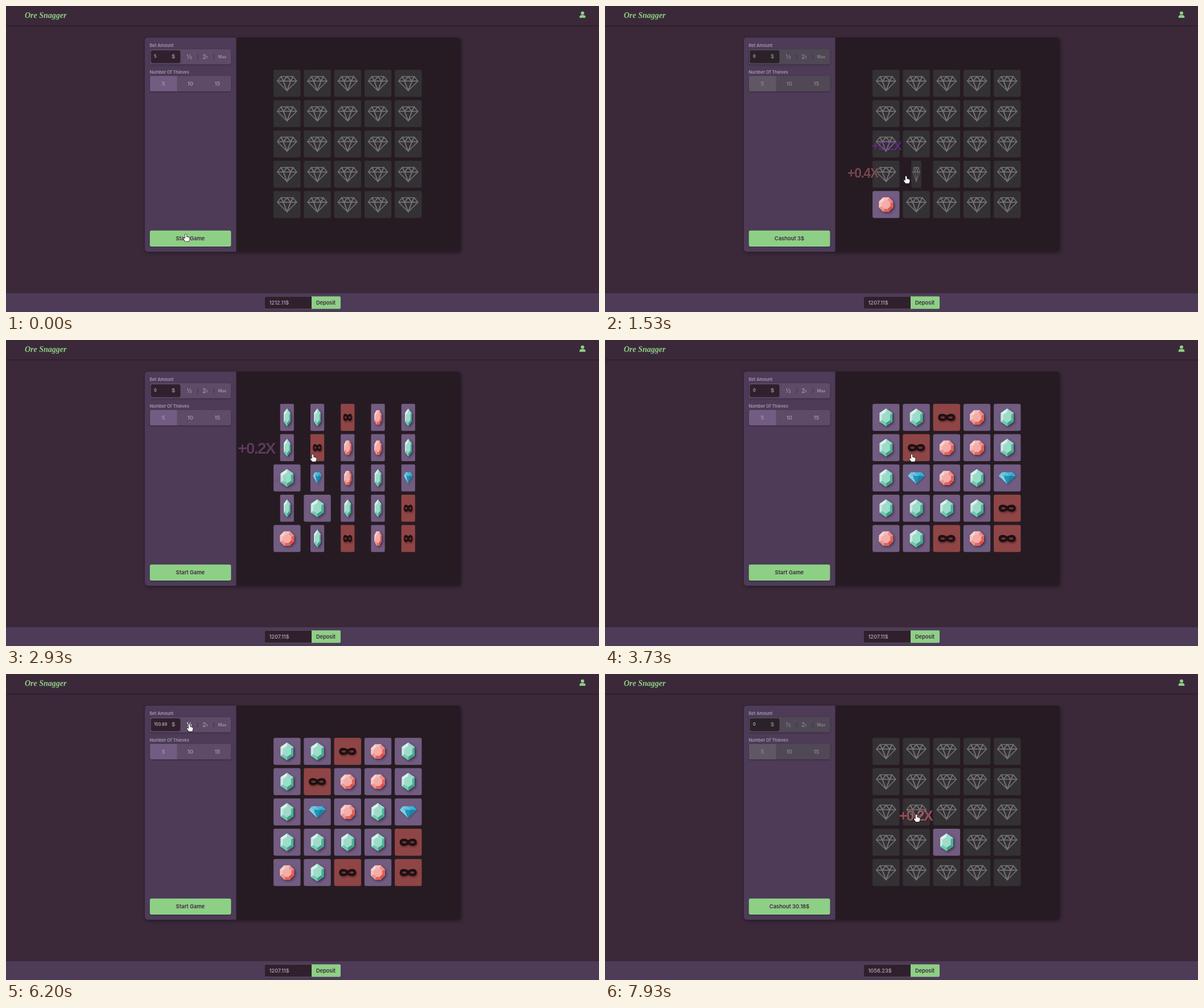
These frames come from a looping animation (1042x538 px, 8 s). An HTML page with a canvas:

```html
<!DOCTYPE html>
<html lang="en">
<head>
<meta charset="utf-8">
<title>Ore Snagger</title>
<style>
  html, body { margin: 0; width: 100%; height: 100%; overflow: hidden; background: #3b293a; }
  canvas { display: block; width: 1042px; height: 538px; }
</style>
</head>
<body>
<canvas id="stage" width="1042" height="538"></canvas>
<script>
const ctx = document.getElementById('stage').getContext('2d');
const LOOP = 8000, FLIP = 600, POPUP = 1600, GLIDE = 400;
const TILE = 47.4, PITCH = 53.25, GRID_X = 470.1, GRID_Y = 112.3;
const BOARD = 'GGTRG' + 'GTRRG' + 'GBRGB' + 'GGGGT' + 'RGTRT';
const PAGE = '#3b293a', PANEL = '#4d3b58', GREEN = '#8ecf86';

const DEPOSITED = 1212.11;
const MAX_CLICK = 5130, HALF_CLICKS = [5470, 5700, 5900];
const GAMES = [
  { start: 400, reveal: 2696, stake: 5, picks: [
    { tile: 20, time: 900, bonus: 0.4, x: 453, y: 302, size: 23, color: '#935a5f' },
    { tile: 16, time: 1389, bonus: 0.2, x: 495, y: 254, size: 22, color: '#9632d6' },
    { tile: 10, time: 2096, bonus: 0.2, x: 440, y: 200, size: 28, color: '#86548a' }] },
  { start: 6730, reveal: Infinity, stake: 150.88, picks: [
    { tile: 17, time: 7270, bonus: 0.2, x: 546, y: 258, size: 25, color: '#c0626a' }] }
];
// Arrival time and place of the pointer tip
const STOPS = [[0, 316, 401], [880, 500, 345], [1380, 529, 299], [2050, 507, 239], [2640, 539, 201],
  [4250, 280, 220], [4550, 333, 111], [4800, 383, 92], [5400, 322, 88], [6650, 334, 400],
  [7240, 597, 300], [7870, 547, 247]];

const clamp = v => Math.max(0, Math.min(1, v));
const within = (t, a, b) => t >= a && t < b;
const pulse = (t, from, to) => clamp(Math.min(t - from, to - t) / 100);
const sum = values => values.reduce((a, b) => a + b, 0);

// The standard CSS "ease" curve
function ease(x) {
  let lo = 0, hi = 1, s;
  for (let i = 0; i < 20; i++) {
    s = (lo + hi) / 2;
    if (0.75 * s * (1 - s) + s ** 3 < x) lo = s; else hi = s;
  }
  return 0.3 * (1 - s) ** 2 * s + 3 * (1 - s) * s * s + s ** 3;
}

function stateAt(t) {
  const started = GAMES.filter(g => g.start <= t);
  const game = started.at(-1);
  const playing = Boolean(game) && t < game.reveal;
  const picks = game ? game.picks.filter(p => p.time <= t) : [];
  const balance = DEPOSITED - sum(started.map(g => g.stake));
  let bet = game ? 0 : GAMES[0].stake;
  if (within(t, MAX_CLICK, GAMES[1].start)) {
    const halvings = HALF_CLICKS.filter(c => c <= t).length;
    bet = Math.floor(balance * 100 / 2 ** halvings) / 100;
  }
  const win = playing ? game.stake * sum(picks.map(p => p.bonus)) : 0;
  return { game, playing, balance, bet, action: playing ? `Cashout ${+win.toFixed(2)}$` : 'Start Game' };
}

function box(x, y, w, h, radius, color) {
  ctx.fillStyle = color;
  ctx.beginPath();
  ctx.roundRect(x, y, w, h, radius);
  ctx.fill();
}

function withShadow(dx, dy, blur, alpha, draw) {
  ctx.save();
  ctx.shadowColor = `rgba(0,0,0,${alpha})`;
  ctx.shadowOffsetX = dx;
  ctx.shadowOffsetY = dy;
  ctx.shadowBlur = blur;
  draw();
  ctx.restore();
}

function text(str, x, y, size, color, align = 'left') {
  ctx.font = `600 ${size}px Inter, sans-serif`;
  ctx.fillStyle = color;
  ctx.textAlign = align;
  ctx.fillText(str, x, y);
}

function trace(points) {
  ctx.beginPath();
  points.forEach(p => ctx.lineTo(...p));
  ctx.closePath();
}

function poly(points, color) {
  trace(points);
  ctx.fillStyle = color;
  ctx.fill();
}

// Regular stone with a flat table; facets are lit from the upper left
function cutStone(sides, turn, rx, ry, shrink, hue, sat, light, contrast) {
  const ring = k => Array.from({ length: sides }, (_, i) => {
    const a = turn + i * 2 * Math.PI / sides;
    return [k * rx * Math.cos(a), k * ry * Math.sin(a)];
  });
  const outer = ring(1), inner = ring(shrink);
  const table = `hsl(${hue} ${sat}% ${light + 7}%)`;
  withShadow(2, 2, 4, 0.5, () => poly(outer, table));
  outer.forEach((p, i) => {
    const j = (i + 1) % sides;
    const facing = Math.cos(turn + (i + 0.5) * 2 * Math.PI / sides + 2.4);
    poly([p, outer[j], inner[j], inner[i]], `hsl(${hue} ${sat}% ${light + contrast * facing}%)`);
  });
  poly(inner, table);
}

// Triangles of a side-view diamond: a strip along the crown, then a fan to the tip
function brilliant(halfWidth, top, girdle, tip) {
  const at = (k, y) => [k * halfWidth, y];
  const g = [-1, -0.38, 0.38, 1].map(k => at(k, girdle));
  const c = [-0.62, 0, 0.62].map(k => at(k, top));
  const strip = [g[0], c[0], g[1], c[1], g[2], c[2], g[3]];
  const crown = strip.slice(2).map((_, i) => strip.slice(i, i + 3));
  const fan = g.slice(1).map((p, i) => [g[i], p, [0, tip]]);
  return [...crown, ...fan];
}

function mask() {
  ctx.fillStyle = '#1e0f13';
  ctx.beginPath();
  ctx.moveTo(0, -3.5);
  for (const s of [1, -1]) {
    ctx.bezierCurveTo(6 * s, -8 * s, 15 * s, -7 * s, 15 * s, 0);
    ctx.bezierCurveTo(15 * s, 7 * s, 6 * s, 8 * s, 0, 3.5 * s);
  }
  for (const x of [-7, 7]) {
    ctx.moveTo(x + 4, 0);
    ctx.ellipse(x, 0, 4, 1.9, 0, 0, 7);
  }
  ctx.fill('evenodd');
}

const faces = {
  G: () => cutStone(6, -Math.PI / 2, 13, 15.5, 0.62, 164, 45, 67, 25),
  R: () => cutStone(8, Math.PI / 8, 13.4, 13.4, 0.6, 3, 75, 74, 16),
  B: () => withShadow(1, 1, 3, 0.3, () =>
    brilliant(15, -10, -3.5, 11).forEach((tri, i) => poly(tri, `hsl(194 72% ${i % 5 ? 72 - 5 * i : 70}%)`))),
  T: () => withShadow(1, 2, 3, 0.4, mask)
};

function hiddenFace() {
  ctx.strokeStyle = '#737073';
  ctx.lineWidth = 1.7;
  ctx.lineJoin = 'round';
  for (const triangle of brilliant(17, -12, -4, 13)) {
    trace(triangle);
    ctx.stroke();
  }
}

function drawTile(i, t, game) {
  const pick = game?.picks.find(p => p.tile === i);
  const start = pick ? pick.time : game ? game.reveal : Infinity;
  const turn = ease(clamp((t - start) / FLIP));
  const open = turn > 0.5, kind = BOARD[i];
  ctx.save();
  ctx.translate(GRID_X + (i % 5) * PITCH + TILE / 2, GRID_Y + Math.floor(i / 5) * PITCH + TILE / 2);
  ctx.scale(Math.max(0.01, Math.abs(Math.cos(turn * Math.PI))), 1);
  box(-TILE / 2, -TILE / 2, TILE, TILE, 3, !open ? '#333133' : kind === 'T' ? '#8f4545' : '#725c81');
  if (open) faces[kind](); else hiddenFace();
  ctx.restore();
}

function drawPopup({ time, bonus, x, y, size, color }, t) {
  const age = t - time, rise = POPUP / 5;
  if (!within(age, 0, POPUP)) return;
  ctx.save();
  ctx.globalAlpha = Math.min(age / rise, (POPUP - age) / (POPUP - rise));
  ctx.font = `700 ${size}px "Liberation Sans", sans-serif`;
  ctx.letterSpacing = '-0.06em';
  ctx.textAlign = 'center';
  ctx.fillStyle = color;
  withShadow(1, 1, 1, 0.5, () => ctx.fillText(`+${bonus}X`, x, y));
  ctx.restore();
}

function drawHeaderAndFooter({ balance }) {
  ctx.fillStyle = PAGE;
  ctx.fillRect(0, 0, 1042, 538);
  withShadow(0, 1, 3, 0.4, () => box(-5, -5, 1052, 39, 0, PAGE));
  box(0, 505, 1042, 33, 0, PANEL);

  ctx.font = 'italic 700 14px "Liberation Serif", serif';
  ctx.textAlign = 'left';
  ctx.fillStyle = GREEN;
  ctx.fillText('Ore Snagger', 33, 20.5);
  ctx.beginPath();
  ctx.arc(1013, 12.4, 3, 0, 7);
  ctx.fill();
  box(1007.6, 16, 10.8, 4.8, [4, 4, 1, 1], GREEN);

  box(455, 510.5, 133, 22, 2, GREEN);
  box(455, 510.5, 82, 22, [2, 0, 0, 2], '#30202d');
  text(balance.toFixed(2) + '$', 462.5, 525, 9.1, '#a898b2');
  text('Deposit', 562, 525, 9.2, PAGE, 'center');
}

function drawControls(t, { playing, bet }) {
  const bar = playing ? '#504854' : '#5d4b68';
  const ink = playing ? '#8a828d' : '#a093a8';
  const lit = on => on ? '#ffffff' : ink;
  text('Bet Amount', 252.5, 71.7, 7.4, '#a698ae');
  text('Number Of Thieves', 252.5, 118.7, 7.4, '#a698ae');

  withShadow(0, 1, 3, 0.3, () => {
    box(253, 76, 142.5, 26.5, 3, bar);
    box(253, 123, 142.5, 27, 3, bar);
  });
  box(254.5, 78, 52, 22.5, 3, playing ? '#2b2229' : '#30202d');
  text(bet, 260, 91.2, 7.2, '#b5a8bb');
  text('$', 294, 92, 9.5, ink, 'center');
  text('½', 322, 92.5, 10.5, lit(within(t, 5350, 6250)), 'center');
  text('2', 345.3, 92.7, 10, ink);
  text('x', 351.5, 92, 5.5, ink);
  text('Max', 380, 92, 7, lit(within(t, 4740, 5230)), 'center');
  for (const x of [336.3, 364.6]) box(x, 85, 1, 9, 0, '#413146');

  box(253, 123, 47.5, 27, [3, 0, 0, 3], playing ? '#605764' : '#725c82');
  [5, 10, 15].forEach((n, i) => text(n, 276.5 + i * 47.4, 140, 9.4, ink, 'center'));
}

function drawActionButton(t, { action }) {
  withShadow(0, 1, 2, 0.3, () => box(252.7, 394.8, 142.8, 28.3, 3, GREEN));
  ctx.globalAlpha = Math.max(pulse(t, 30, 600), pulse(t, 6580, 7180));
  box(252.7, 394.8, 142.8, 28.3, 3, '#9cdc7e');
  ctx.globalAlpha = 1;
  text(action, 324, 412.3, 9.4, PAGE, 'center');
}

function pointerAt(t) {
  const next = STOPS.findIndex(s => s[0] > t);
  if (next < 0) return STOPS.at(-1).slice(1);
  const [, x0, y0] = STOPS[next - 1], [arrival, x1, y1] = STOPS[next];
  const u = clamp(1 - (arrival - t) / Math.min(GLIDE, arrival - STOPS[next - 1][0]));
  const k = u * u * (3 - 2 * u);
  return [x0 + (x1 - x0) * k, y0 + (y1 - y0) * k];
}

function isClickable(x, y) {
  const inside = (left, top, right, bottom) => within(x, left, right) && within(y, top, bottom);
  return inside(470, 112, 730, 373) || inside(253, 395, 395, 423) ||
    inside(253, 76, 395, 103) || inside(253, 123, 395, 150);
}

const HAND = new Path2D('M-1.2 .8Q0-.6 1.2 .8V5Q2.4 4.3 3 5.4Q4.3 4.8 4.8 6Q6.2 5.6 6.4 7V9.5L5.2 12.8H-.8L-4 8.6Q-4.3 6.6-2.6 7L-1.2 8.2Z');
const ARROW = new Path2D('M0 0V11L2.6 8.6L4.4 12.4L6.2 11.6L4.5 7.9H8Z');

function drawPointer(t) {
  const [x, y] = pointerAt(t);
  const shape = isClickable(x, y) ? HAND : ARROW;
  ctx.save();
  ctx.translate(x, y);
  ctx.lineWidth = 1.4;
  ctx.strokeStyle = '#1b151b';
  ctx.stroke(shape);
  ctx.fillStyle = '#fff';
  ctx.fill(shape);
  ctx.restore();
}

function drawFrame(t) {
  const state = stateAt(t);
  drawHeaderAndFooter(state);
  withShadow(1, 2, 6, 0.4, () => box(244, 55.5, 555, 376.5, 5, '#271b23'));
  box(244, 55.5, 160.5, 376.5, [5, 0, 0, 5], PANEL);
  drawControls(t, state);
  drawActionButton(t, state);
  for (let i = 0; i < BOARD.length; i++) drawTile(i, t, state.game);
  GAMES.forEach(g => g.picks.forEach(p => drawPopup(p, t)));
  drawPointer(t);
}

const origin = performance.now();
function loop() {
  drawFrame((performance.now() - origin) % LOOP);
  requestAnimationFrame(loop);
}
loop();
</script>
</body>
</html>
```
